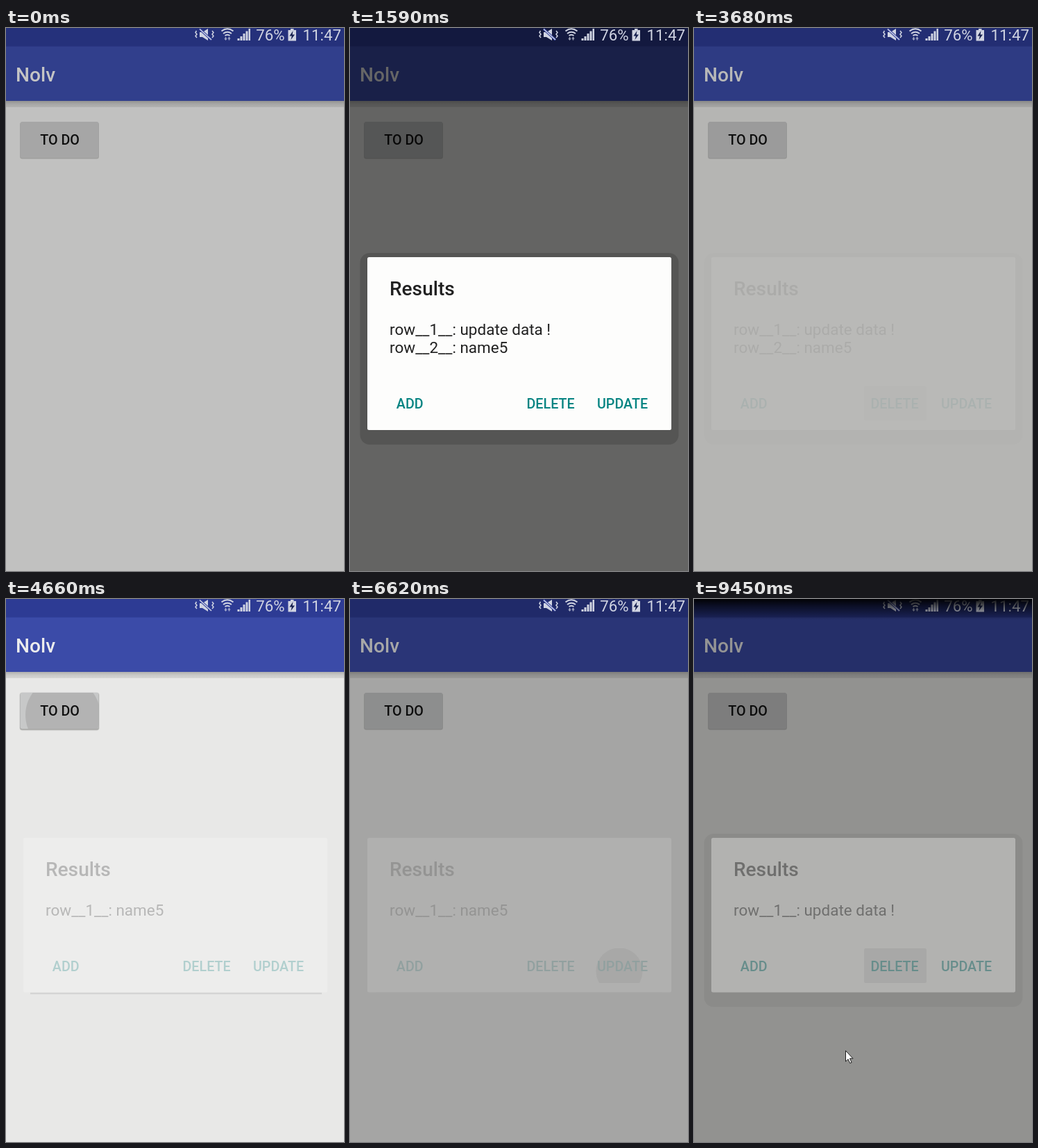
Recreate the animation shown at these times as an HTML page. Size 487 px wide and 782 px high, loop 9550 ms.

```html
<!DOCTYPE html>
<html lang="en">
<head>
<meta charset="utf-8">
<title>To do dialog</title>
<style>
  html, body { margin: 0; width: 100%; height: 100%; overflow: hidden; background: #fafaf8; }
  svg { display: block; width: 100%; height: 100%; }
  text { font-family: Roboto, "Open Sans", sans-serif; white-space: pre; }
  .title { font-size: 28.1px; font-weight: 500; }
  .button { font-size: 19.7px; font-weight: 500; }
  .body { font-size: 22.5px; fill: #212121; }
  .status { font-size: 22.3px; }
</style>
</head>
<body>
<svg viewBox="0 0 487 782" preserveAspectRatio="none">
  <defs>
    <linearGradient id="barShadow" x2="0" y2="1">
      <stop offset="0" stop-opacity=".26"/>
      <stop offset=".5" stop-opacity=".14"/>
      <stop offset="1" stop-opacity=".08"/>
    </linearGradient>
    <linearGradient id="topFade" x2="0" y2="1">
      <stop offset="0" stop-opacity=".95"/>
      <stop offset=".33" stop-opacity=".6"/>
      <stop offset=".67" stop-opacity=".3"/>
      <stop offset="1" stop-opacity="0"/>
    </linearGradient>
    <clipPath id="todoClip"><rect x="20.5" y="135" width="113" height="52" rx="3"/></clipPath>
    <clipPath id="actionClip"><rect id="actionBox" height="50" rx="2.5"/></clipPath>
  </defs>

  <rect width="487" height="782" fill="#fafaf8"/>
  <rect y="104.5" width="487" height="9.5" fill="url(#barShadow)"/>
  <rect width="487" height="105" fill="#3f51b5"/>
  <rect width="487" height="26.5" fill="#303f9f"/>
  <text class="title" x="14" y="76.5" fill="#fff">Nolv</text>

  <rect x="20" y="135.5" width="114" height="53" rx="3.5" opacity=".18"/>
  <rect id="lift" x="19.5" y="134.5" width="115" height="55" rx="4" opacity=".12"/>
  <rect x="20.5" y="135" width="113" height="52" rx="3" fill="#d6d7d7"/>
  <circle id="todoRipple" cx="82" cy="167" clip-path="url(#todoClip)"/>
  <text class="button" x="49.3" y="168" opacity=".9">TO DO</text>

  <rect id="dim" width="487" height="782"/>

  <g fill="#d0d4e2" stroke="none">
    <path d="M279 6h4l8-5v17l-8-5h-4z"/>
    <path d="M279 1.5L296 17" stroke="#303f9f" stroke-width="3.4"/>
    <path d="M279 1.5L296 17M274.500 4l-1.500 2.500 2 2.500-2 2.500 2 2.500M297 4l2 2.500-2 2.500 2 2.500-2 2.500" fill="none" stroke="#d0d4e2" stroke-width="1.5"/>
    <path d="M310.500 4.500q8.500-6.500 17 0M313 8q6-4.500 12 0M315.500 11q3.500-2.600 7 0" fill="none" stroke="#d0d4e2" stroke-width="2"/>
    <path d="M316.500 18l-2.200-3h1.400v-2h1.600v2h1.400zM321.500 12.500l2.200 3h-1.400v2h-1.600v-2h-1.400z" opacity=".75"/>
    <path d="M333.500 18v-3h3v3zM337.500 18v-6h3v6zM341.500 18v-10h3v10zM345.500 18v-13.500h3v13.500zM349.500 18v-17h2.500v17z"/>
    <text class="status" x="360.200" y="18">76%</text>
    <path d="M406.500 3h3.500v-2h4.500v2h3.500v15.500h-11.500z"/>
    <path d="M413.500 4l-5 7.500h3.300l-1.300 5.500 5.500-7.500h-3.400z" fill="#16204f"/>
    <text class="status" x="427.500" y="18">11:47</text>
  </g>
  <rect id="fade" width="487" height="30" fill="url(#topFade)"/>

  <g id="dialog">
    <rect id="shadow" rx="14" opacity=".15"/>
    <path id="edge" d="M35 568H455" stroke="#000" stroke-width="2.500" opacity=".35"/>
    <rect id="panel" x="25" width="438" rx="2.500" fill="#fdfdfc"/>
    <g id="content">
      <text class="title" x="57" y="55" fill="#212121">Results</text>
      <text class="body" id="row0" x="57" y="111.500"/>
      <text class="body" id="row1" x="57" y="138"/>
    </g>
    <circle id="actionRipple" clip-path="url(#actionClip)"/>
    <g id="actions" fill="#068482">
      <text class="button" x="66.800">ADD</text>
      <text class="button" x="254.500">DELETE</text>
      <text class="button" x="356">UPDATE</text>
    </g>
  </g>

  <path id="cursor" d="M.5.500v15.500l3.600-3.300 2.600 5.800 2.400-1-2.600-5.700h4.600z" fill="#fff" stroke="#1c1c1c"/>
</svg>
<script>
const LOOP = 9550, STEP = 120;
const byId = Object.fromEntries([...document.querySelectorAll("[id]")].map(e => [e.id, e]));

function set(id, attrs) {
  for (const key in attrs) byId[id].setAttribute(key, attrs[key]);
}

// Scene entries: time, background dim, dialog opacity, shadow spread
const opening = (press, settled = press + 5 * STEP) => [
  [press + 2 * STEP, .07, .24, 0],
  [press + 3 * STEP, .3, .85, .3],
  [press + 4 * STEP, .51, 1, .6],
  [settled, .6, 1, 1]
];
const scene = [
  [0, .228, 0, 0], [120, 0, 0, 0],
  ...opening(990),
  [3560, .5, .6, 1], [3680, .28, .06, 1], [3800, 0, 0, 0],
  ...opening(4420),
  [6500, .52, .6, 1], [6620, .34, .12, 0], [6740, 0, 0, 0],
  ...opening(7270, 8000),
  [9330, .55, .75, 1], [9450, .42, .3, 1]
];

const cursorPath = [
  [7630, 165, 699], [7750, 178, 685], [8000, 197, 673],
  [8120, 215, 661], [8370, 217, 655], [8490, 218, 650]
];

const DELETE = { x: 245, width: 90, cx: 290, cy: 25, grow: 14, shade: .13 };
const UPDATE = { x: 346, width: 95, cx: 388, cy: 33, grow: 6.7, shade: .25 };
const taps = [
  { start: 2960, end: 3800, on: DELETE },
  { start: 6140, end: 6740, on: UPDATE },
  { start: 8730, end: LOOP, on: DELETE }
];
const presses = [{ start: 990 }, { start: 4420 }, { start: 7270, shown: 7390 }];

const current = (list, t) => list.findLast(entry => entry[0] <= t);
const stepsSince = (start, t) => Math.floor((t - start) / STEP);

function rowsAt(t) {
  if (t < 4000) return ["update data !", "name5"];
  return [t < 7000 ? "name5" : "update data !"];
}

function drawTodoButton(t) {
  const press = presses.find(p => t >= (p.shown ?? p.start) && t < p.start + 4 * STEP);
  const k = press ? stepsSince(press.start, t) : -1;
  set("todoRipple", { r: 26 + 14 * k, opacity: [.08, .1, .1, .05][k] ?? 0 });
  set("lift", { visibility: press ? "visible" : "hidden" });
}

function drawDialog(t, alpha, spread) {
  set("dialog", { opacity: alpha, visibility: alpha ? "visible" : "hidden" });
  if (!alpha) return;

  const rows = rowsAt(t);
  const top = rows.length > 1 ? 330 : 344;
  const bottom = rows.length > 1 ? 579 : 566.5;
  set("panel", { y: top, height: bottom - top });
  set("shadow", {
    x: 25 - 10.5 * spread, width: 438 + 21 * spread,
    y: top - 6 * spread, height: bottom - top + 27 * spread
  });
  set("edge", {
    transform: `translate(0 ${bottom - 566.5})`,
    visibility: alpha < .5 && alpha > .2 && !spread ? "visible" : "hidden"
  });
  set("content", { transform: `translate(0 ${top})` });
  set("actions", { transform: `translate(0 ${bottom - 31})` });
  for (const i of [0, 1]) {
    byId["row" + i].textContent = i in rows ? `row__${i + 1}__: ${rows[i]}` : "";
  }

  const tap = taps.find(p => t >= p.start && t < p.end);
  set("actionRipple", { visibility: tap ? "visible" : "hidden" });
  if (!tap) return;
  const { x, width, cx, cy, grow, shade } = tap.on;
  const y = bottom - 63.5;
  set("actionBox", { x, y, width });
  set("actionRipple", { cx, cy: y + cy, r: grow * (stepsSince(tap.start, t) + 1), opacity: shade });
}

function draw(t) {
  const [, dim, alpha, spread] = current(scene, t);
  set("dim", { opacity: dim });
  drawTodoButton(t);
  drawDialog(t, alpha, spread);

  const pointer = current(cursorPath, t);
  const visibility = pointer ? "visible" : "hidden";
  set("fade", { visibility });
  set("cursor", { visibility, transform: pointer ? `translate(${pointer[1]} ${pointer[2]})` : "" });
}

const origin = performance.now();
function tick() {
  draw((performance.now() - origin) % LOOP);
  requestAnimationFrame(tick);
}
tick();
</script>
</body>
</html>
```
